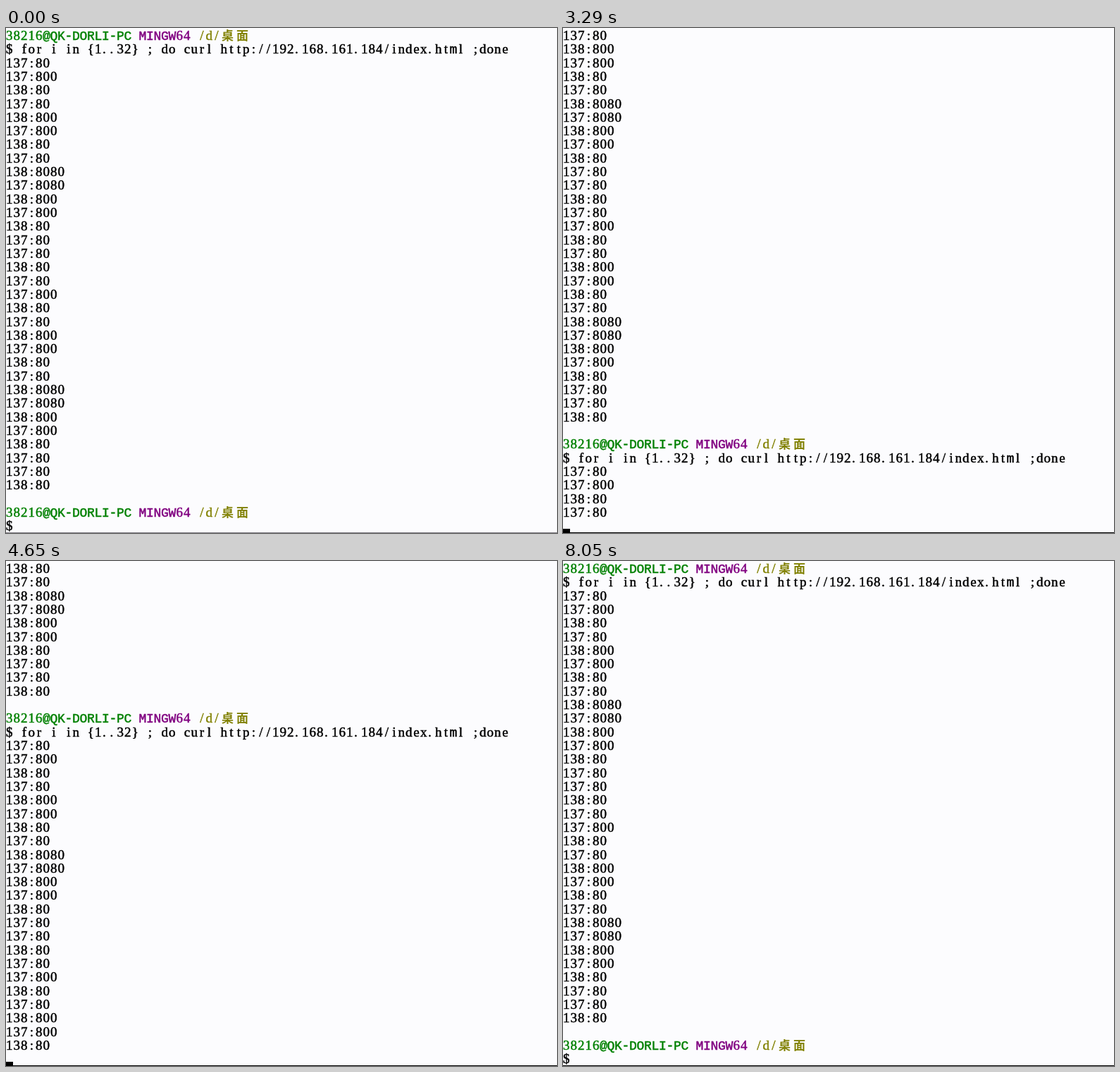
Animation, 782 px wide and 716 px high, one loop 8330 ms. Source, as an HTML page with a canvas:

```html
<!DOCTYPE html>
<html lang="en">
<head>
<meta charset="utf-8">
<title>Terminal</title>
<style>
html, body { margin: 0; width: 100%; height: 100%; overflow: hidden; background: #fcfcfe; }
canvas { display: block; }
</style>
</head>
<body>
<canvas id="stage" width="782" height="716"></canvas>
<script>
const ctx = document.getElementById('stage').getContext('2d');
const LOOP = 8330, CELL = 10.5, PITCH = 19.31, ROWS = 37;

const SERIF = '19px "Liberation Serif", serif';
const MONO = '18px "Liberation Mono", monospace';
const CJK = 'bold 17px "Noto Sans CJK SC", "Noto Sans CJK", sans-serif';

// Each line is a list of [text, colour] spans.
const plain = text => [[text, '#000']];
const prompt = [['38216@QK-DORLI-PC ', '#008000'], ['MINGW64 ', '#800080'], ['/d/桌面', '#808000']];
const command = plain('$ for i in {1..32} ; do curl http://192.168.161.184/index.html ;done');
const replies = ('137:80 137:800 138:80 137:80 138:800 137:800 138:80 137:80 ' +
  '138:8080 137:8080 138:800 137:800 138:80 137:80 137:80 138:80').split(' ').map(plain);
const run = [prompt, command, ...replies, ...replies, plain('')];
const transcript = [...run, ...run, prompt, plain('$')];

const TYPED = 1870, ENTER = 2990, DONE = 5520;
// [time, replies received], linear in between
const progress = [[2990, 0], [3290, 4], [3370, 5], [3820, 11], [3900, 12], [4150, 16],
  [4240, 17], [4650, 23], [4740, 24], [5120, 29], [5240, 30], [5360, 32]];
const cursorToggles = [840, 1170, 1700, 2200, 2740, 5940, 6470, 7020, 7520, 8050];

function repliesAt(t) {
  const i = progress.findIndex(p => p[0] > t);
  if (i < 0) return 32;
  const [t0, n0] = progress[i - 1], [t1, n1] = progress[i];
  return Math.floor(n0 + (n1 - n0) * (t - t0) / (t1 - t0) + 1e-6);
}

function drawLine(spans, row) {
  const y = Math.round(17 + row * PITCH);
  let col = 0;
  for (const [text, colour] of spans) {
    ctx.fillStyle = ctx.strokeStyle = colour;
    for (const ch of text) {
      const wide = ch > '\u2e80', span = wide ? 2 : 1;
      const x = (col + span / 2) * CELL - (ch === '.' ? 2.5 : 0.4);
      ctx.font = wide ? CJK : /[A-Z@m-]/.test(ch) ? MONO : SERIF;
      ctx.fillText(ch, x, y);
      if (!wide) ctx.strokeText(ch, x, y);
      col += span;
    }
  }
}

function draw(t) {
  ctx.fillStyle = '#fcfcfe';
  ctx.fillRect(0, 0, 782, 716);
  ctx.textAlign = 'center';
  ctx.lineWidth = 0.5;

  const running = t >= ENTER && t < DONE;
  const typed = t >= TYPED && t < ENTER;
  const scroll = t < ENTER ? 0 : running ? repliesAt(t) + 1 : 35;
  for (let row = 0; row < ROWS; row++) {
    const index = scroll + row;
    if (running && row === ROWS - 1) continue;
    const entered = index === 36 && (typed || t >= ENTER);
    drawLine(index === 36 && !entered ? plain('$') : transcript[index], row);
  }

  const toggles = cursorToggles.filter(s => s <= t).length;
  if (running || toggles % 2) {
    ctx.fillStyle = '#000';
    ctx.fillRect(running ? 0 : typed ? 714 : 21, 710, 10, 5);
  }
  ctx.fillStyle = t < 620 ? '#807c84' : '#000';
  ctx.fillRect(0, 715, 782, 1);
}

const start = performance.now();
function tick() {
  draw((performance.now() - start) % LOOP);
  requestAnimationFrame(tick);
}
tick();
</script>
</body>
</html>
```
